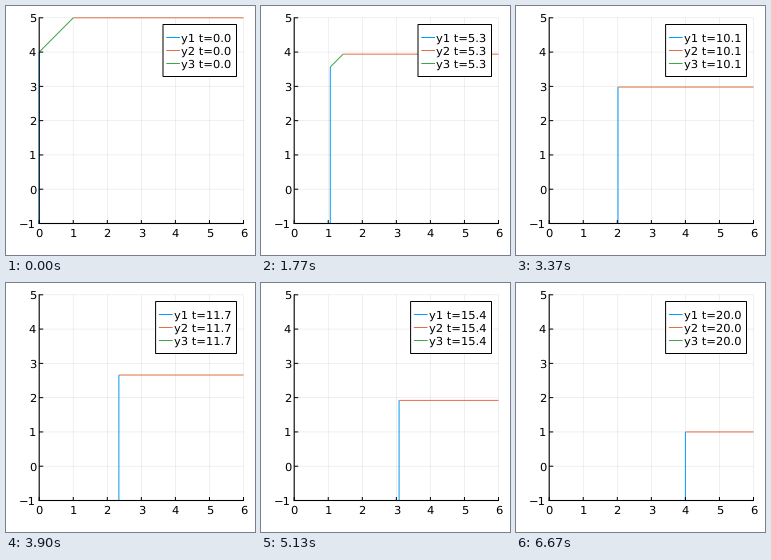
Animation of 249 by 249 pixels, one loop 6.71 s. Source, as a matplotlib script:

```python
import matplotlib.pyplot as plt
from matplotlib.animation import FuncAnimation
from matplotlib.patches import Rectangle

SIZE, DPI = 249, 100
PX = 72 / DPI                       # points per pixel
LEFT, RIGHT, TOP, BOTTOM = 33.2, 237.5, 11.8, 217.5
BLUE, ORANGE, GREEN = "#009AFA", "#E36F47", "#3EA44E"
TICK_MS, TICKS, LAST_STEP = 10, 671, 200

plt.rcParams.update({"font.family": "DejaVu Sans", "text.hinting": "none"})
fig = plt.figure(figsize=(SIZE / DPI, SIZE / DPI), dpi=DPI, facecolor="white")
ax = fig.add_axes([0, 0, 1, 1])
ax.set(xlim=(0, SIZE), ylim=(SIZE, 0))
ax.axis("off")


def sx(x):
    return LEFT + x * (RIGHT - LEFT) / 6


def sy(y):
    return BOTTOM - (y + 1) * (BOTTOM - TOP) / 6


def line(xs, ys, color, width=1.0, z=2, alpha=1):
    return ax.plot(xs, ys, color=color, lw=width * PX, zorder=z, alpha=alpha,
                   snap=False, solid_capstyle="butt")[0]


def label(x, y, text, ha, z=4):
    return ax.text(x, y, text, ha=ha, va="baseline", zorder=z,
                   fontsize=11.5 * PX, color="black")


# Grid, ticks and axes
for v in range(7):
    x, y = sx(v), sy(v - 1)
    line([x, x], [TOP, BOTTOM], "black", 0.6, 1, 0.1)
    line([LEFT, RIGHT], [y, y], "black", 0.6, 1, 0.1)
    line([x, x], [BOTTOM, BOTTOM - 3.5], "black", 1, 3)
    line([LEFT, LEFT + 4], [y, y], "black", 1, 3)
    label(x, 230.6, str(v), "center")
    label(30.2, y + 4.3, str(v - 1).replace("-", "\u2212"), "right")
line([LEFT, LEFT], [TOP - 0.5, BOTTOM + 0.5], "black", 1.1, 3)
line([LEFT - 0.5, RIGHT + 0.5], [BOTTOM, BOTTOM], "black", 1.1, 3)

# Curves
wall = line([], [], BLUE)
roof = line([], [], ORANGE)
bevel = line([], [], GREEN)

# Legend
box = ax.add_patch(Rectangle((157, 18.5), 73.5, 52, fc="white", ec="black",
                             lw=PX, zorder=5, snap=False))
keys, names = [], []
for i, color in enumerate((BLUE, ORANGE, GREEN)):
    y = 31.5 + 13 * i
    keys.append(line([], [], color, z=6))
    keys[-1].set_ydata([y, y])
    names.append(label(0, y + 4.5, "", "left", 6))


def update(tick):
    step = min(LAST_STEP, (30 * tick + 15) // 100)
    t = step / 10
    x, y = t / 5, 5 - t / 5
    cut = max(0, 1 - 0.118 * t)

    wall.set_data([sx(x)] * 2, [sy(-1), sy(y - cut)])
    bevel.set_data([sx(x), sx(x + cut)], [sy(y - cut), sy(y)])
    roof.set_data([sx(x + cut), sx(6)], [sy(y)] * 2)

    left = 149.6 if t >= 10 else 157
    box.set_x(left)
    box.set_width(230.5 - left)
    for i, (key, name) in enumerate(zip(keys, names), 1):
        key.set_xdata([left + 3.3, left + 17])
        name.set_x(left + 18)
        name.set_text(f"y{i} t={t:.1f}")
    return [wall, roof, bevel, box, *keys, *names]


anim = FuncAnimation(fig, update, frames=TICKS, interval=TICK_MS,
                     repeat=True, repeat_delay=0, blit=False)
plt.show()
```
